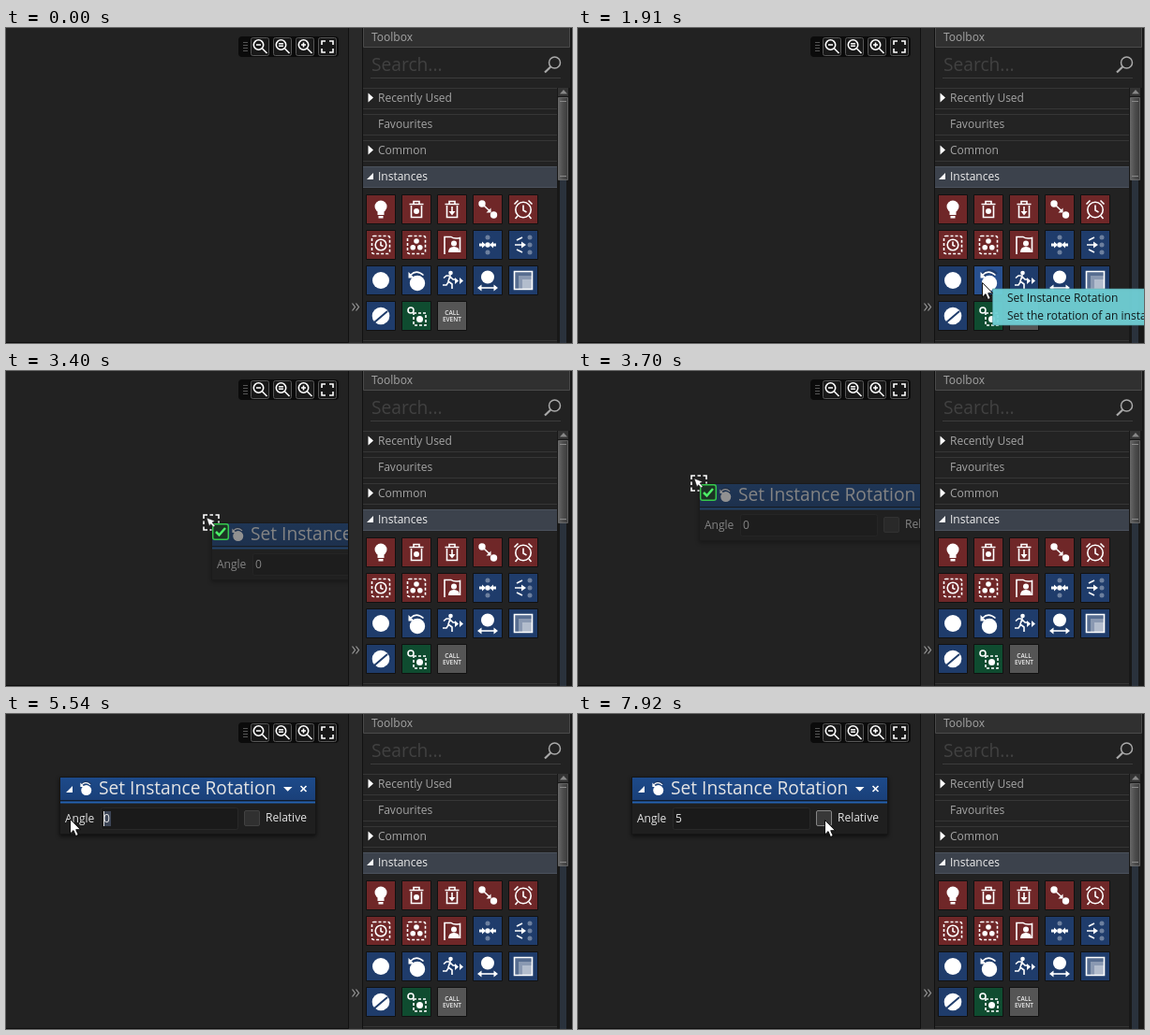
These frames come from a looping animation (604x337 px, 8000 ms). An HTML page:

```html
<!DOCTYPE html>
<html lang="en">
<head>
<meta charset="utf-8">
<title>Toolbox drag and drop</title>
<style>
  html, body { margin: 0; width: 100%; height: 100%; overflow: hidden; background: #222; }
  svg { display: block; width: 604px; height: 337px; }
  text { font: 12px "Open Sans", sans-serif; fill: #a4a4a4; white-space: pre; }
  .big { font-size: 19.2px; }
  .line { fill: none; stroke: #fff; stroke-width: 1.6; }
  .dash { fill: none; stroke: #fff; stroke-width: 1.6; stroke-dasharray: 3 2; }
  .white { fill: #fff; }
  .lite text { fill: #e4e4e4; }
  #node { filter: drop-shadow(0 2px 2px #0009); }
</style>
</head>
<body>
<svg viewBox="0 0 604 337">
  <defs>
    <clipPath id="work"><path d="M0 0H365V337H0Z"/></clipPath>
    <linearGradient id="head" x2="0" y2="1">
      <stop stop-color="#1d4a8a"/><stop offset="1" stop-color="#1a4079"/>
    </linearGradient>
    <linearGradient id="thumb">
      <stop stop-color="#666"/><stop offset=".5" stop-color="#4c4c4c"/><stop offset="1" stop-color="#3c3c3c"/>
    </linearGradient>
    <g id="turn">
      <circle class="white" cx="16" cy="18" r="8.2"/>
      <path d="M8 11Q15 1 23 9" fill="none" stroke="#1f3c6b" stroke-width="5"/>
      <path class="line" stroke-width="2" d="M9 9Q15 3 22.500 9.500"/>
      <path class="white" d="M6.500 6V12.500H13Z"/>
    </g>
    <g id="lens">
      <rect x=".5" y=".5" width="19" height="19" rx="2" fill="#181818" stroke="#565656"/>
      <circle class="line" cx="8.500" cy="8" r="5.200"/>
      <path class="line" stroke-width="2.200" d="M12.500 12L17.500 17"/>
    </g>
    <path id="arrow" d="M.5 .5V16L4 12.600L6.500 18.500L9.200 17.300L6.700 11.700H11.500Z"/>
  </defs>

  <path fill="#222" d="M0 0H604V337H0Z"/>

  <g transform="translate(248 9)">
    <rect width="107" height="22" rx="4" fill="#0b0b0b"/>
    <path d="M5 6.500H10M5 9.500H10M5 12.500H10M5 15.500H10" stroke="#555"/>
    <use href="#lens" x="13" y="1"/><use href="#lens" x="37" y="1"/><use href="#lens" x="61" y="1"/>
    <rect x="85.500" y="1.500" width="19" height="19" rx="2" fill="#181818" stroke="#565656"/>
    <path class="line" stroke-width="1.400" d="M19 9H24M43 7.800H48M43 10.200H48M67 9H72M69.500 6.500V11.500"/>
    <path class="line" d="M89 9V5H93M97 5H101V9M101 13V17H97M93 17H89V13"/>
  </g>

  <g clip-path="url(#work)">
    <g id="node" class="lite">
      <path fill="#1f1f1f" stroke="#161616" d="M-.5 -.5H272.500V60.500H-.5Z"/>
      <path fill="url(#head)" d="M0 0H272V24H0Z"/>
      <path fill="#101b2c" d="M0 24H272V26H0Z"/>
      <path fill="#2462b0" d="M0 25.500H272V27.500H0Z"/>
      <path class="white" d="M13 9V16H6ZM238 10H247.500L242.700 14.800Z"/>
      <use href="#turn" transform="translate(17 1.500) scale(.67)"/>
      <text class="big" x="41" y="18">Set Instance Rotation</text>
      <path class="line" d="M256.500 9L262.500 15M262.500 9L256.500 15"/>
      <text x="5" y="48">Angle</text>
      <rect x="43.500" y="32.500" width="146" height="23" rx="2" fill="#1a1a1a" stroke="#292929"/>
      <path id="mark" fill="#3d4657" d="M46 36H54V52H46Z"/>
      <text id="value" x="46" y="48">0</text>
      <path id="caret" fill="#ddd" d="M0 36H1V52H0Z"/>
      <rect id="box" x="196.500" y="35.500" width="16" height="16" rx="1.500"/>
      <text x="219" y="47">Relative</text>
    </g>
  </g>
  <path fill="#0e0e0e" d="M0 336H366V337H0Z"/>

  <g id="panel">
    <path fill="#292929" d="M366 0H381V337H366Z"/>
    <path fill="#111" d="M365 0H366V337H365ZM380 0H381V337H380Z"/>
    <path d="M369.500 294.500L372.500 298.500L369.500 302.500M373.500 294.500L376.500 298.500L373.500 302.500" fill="none" stroke="#999" stroke-width="1.200"/>
    <path fill="#222" d="M381 0H602V337H381Z"/>
    <path fill="#303030" stroke="#4a4a4a" d="M381.500 -1H601.500V20.500H381.500Z"/>
    <text x="390" y="14">Toolbox</text>
    <text class="big" x="390" y="46" style="fill:#414141">Search...</text>
    <path fill="#3c3c3c" d="M389 53H592V54H389Z"/>
    <circle cx="585.500" cy="37" r="6" fill="none" stroke="#aaa" stroke-width="1.500"/>
    <path d="M581.200 41.500L575 47.500" stroke="#aaa" stroke-width="2.200"/>
    <g id="rows"></g>
    <path fill="#363636" d="M381 334H588V335H381Z"/>
    <path fill="#181818" d="M588 64H602V337H588Z"/>
    <path fill="#2a323c" d="M591 162H598V337H591Z"/>
    <path fill="#333" d="M589 64H600V73H589Z"/>
    <path fill="#888" d="M591 70.500H599L595 66Z"/>
    <path fill="url(#thumb)" stroke="#777" stroke-width=".7" d="M589.500 74.500H599.500V162.500H589.500Z"/>
    <path fill="#888" d="M591 78H598V79H591ZM591 158H598V159H591Z"/>
    <path fill="#171717" d="M602 0H604V337H602Z"/>
    <g id="tiles"></g>
  </g>

  <g id="tip">
    <path fill="#70d0d6" stroke="#4a8f94" stroke-width=".6" d="M442.500 279H606V318H442.500Z"/>
    <text x="458" y="293" style="fill:#10191a">Set Instance Rotation</text>
    <text x="458" y="312" style="fill:#10191a">Set the rotation of an instance.</text>
  </g>

  <g id="drag">
    <g id="big" transform="translate(10 7) scale(2.100)">
      <path fill="#1f3c6b" stroke="#111" stroke-width=".5" d="M0 0H30V30H0Z"/>
      <use href="#turn"/>
    </g>
    <path id="badge" d="M13 10.700H25Q27.300 10.700 27.300 13V25Q27.300 27.300 25 27.300H13Q10.700 27.300 10.700 25V13Q10.700 10.700 13 10.700Z" fill="#1c3324" stroke="#35c94d" stroke-width="1.500"/>
    <path d="M14 19L17.500 22.500L24 15" fill="none" stroke="#4df067" stroke-width="2.500"/>
    <path d="M1 5V1H5M7.500 1H11M13.500 1H17V5M17 7.500V9.500M1 7.500V11M1 13.500V17H5M7.500 17H9.500" class="line" stroke="#fff"/>
    <path class="white" stroke="#111" stroke-width=".5" d="M4 4L13 7.500L10 9L13 12.500L11.500 14L8.500 10.700L7 13Z"/>
  </g>
  <use id="cursor" href="#arrow" fill="#fff" stroke="#000" stroke-width=".9"/>
</svg>

<script>
const $ = id => document.getElementById(id);
const LOOP = 8000;

// Section headers
$('rows').innerHTML = ['Recently Used', 'Favourites', 'Common', 'Instances'].map((name, i) => {
  const y = 64 + 28 * i, open = i === 3;
  const sign = open ? 'M392 155V162H385Z' : i === 1 ? '' : `M386.500 ${y + 5.5}L392 ${y + 10.5}L386.500 ${y + 15.5}Z`;
  return `<path fill="${open ? '#3c424c' : '#232323'}" d="M381 ${y}H588V${y + 23}H381Z"/>
    <path fill="${open ? '#4b525d' : '#363636'}" d="M381 ${y}H588V${y + 1}H381ZM381 ${y + 22}H588V${y + 23}H381Z"/>
    <path class="white" d="${sign}"/>
    <text x="397" y="${y + 15}" ${open ? 'style="fill:#eee"' : ''}>${name}</text>`;
}).join('');

// Tile glyphs, drawn on a 30 x 30 cell
const dot = (x, y, r, more = '') => `<circle class="white" cx="${x}" cy="${y}" r="${r}" ${more}/>`;
const ring = (x, y, r) => `<circle class="line" cx="${x}" cy="${y}" r="${r}"/>`;
const line = d => `<path class="line" d="${d}"/>`;
const solid = d => `<path class="white" d="${d}"/>`;
const frame = '<rect class="dash" x="5.500" y="5.500" width="19" height="19" rx="2"/>';
const bin = line('M9.500 11V23.500H20.500V11M7.500 9.500H22.500M12 9V6.500H18V9');
const dim = 'opacity=".35"';

const RED = '#6f2728', BLUE = '#1f3c6b', GREEN = '#0f4c30', GREY = '#555';
const tiles = [
  [RED, dot(15, 12, 6.5) + solid('M11.500 15H18.500V21H11.500ZM12.500 22H17.500V24.500H12.500Z')],
  [RED, bin + dot(15, 17, 3)],
  [RED, bin + line('M15 12V19') + solid('M11.500 17H18.500L15 21.500Z')],
  [RED, dot(9, 9, 3.7) + dot(21.5, 21, 3.7) + line('M11 11L18 17.500') + solid('M18.500 13.500V18.500H13.500Z')],
  [RED, ring(15, 15.5, 8.2) + line('M15 10.500V16L18.500 18M5.500 9.500L9.500 5.500M24.500 9.500L20.500 5.500M9 22L6.500 25M21 22L23.500 25')],
  [RED, frame + ring(15, 15, 5.8) + line('M15 11.500V15.500L17.500 16.500')],
  [RED, frame + dot(15, 11, 2.8) + dot(11.2, 17.7, 2.8) + dot(18.8, 17.7, 2.8)],
  [RED, line('M7 25V6.500H14Q17 9 23.500 7.500V23') + dot(17, 13.5, 3) + solid('M11 23Q11 17 17 17T23 23Z')],
  [BLUE, dot(15, 7, 2.5, dim) + dot(15, 23, 2.5, dim) + dot(15, 15, 2.7) + solid('M6 13.500H9V11.500L13 15L9 18.500V16.500H6ZM24 13.500H21V11.500L17 15L21 18.500V16.500H24Z')],
  [BLUE, dot(22, 7, 2.5, dim) + dot(22, 23, 2.5, dim) + dot(22, 15, 2.5, dim) + line('M6 15H14M8 10L14 7M8 20L14 23') + solid('M13 11.500L18 15L13 18.500Z')],
  [BLUE, dot(15, 15, 9)],
  [BLUE, '<use href="#turn"/>'],
  [BLUE, dot(13.5, 7, 2.3) + line('M6 12.500L9 10H13L11 16L15 19V24M11 17L9 20H5M13 11L16 14H18') + solid('M18 12L22 15.500L18 19ZM23 12L27 15.500L23 19Z')],
  [BLUE, dot(15, 11.5, 7) + line('M7 23H23') + solid('M8.500 19.500V26.500L4 23ZM21.500 19.500V26.500L26 23Z')],
  [BLUE, '<path fill="#fff" opacity=".25" d="M6 6H24V24H6Z"/><path fill="#fff" opacity=".3" d="M10 10H24V24H10Z"/><path fill="#fff" opacity=".35" d="M14 14H24V24H14Z"/>' + line('M5.500 5.500H24.500V24.500H5.500Z')],
  [BLUE, dot(15, 15, 9.3) + `<path d="M8 22L22 10" stroke="${BLUE}" stroke-width="2"/>`],
  [GREEN, ring(9, 9, 3) + '<rect class="dash" x="12" y="12" width="13" height="13"/>' + dot(18.5, 18.5, 3.5)],
  [GREY, ['CALL', 'EVENT'].map((s, i) => `<text x="15" y="${13.5 + 7 * i}" text-anchor="middle" style="font-size:6.500px;font-weight:600;fill:#eee">${s}</text>`).join('')]
];
$('tiles').innerHTML = tiles.map(([fill, glyph], i) =>
  `<g transform="translate(${385 + 38 * (i % 5)} ${179 + 38 * Math.floor(i / 5)})">
    <path fill="${fill}" stroke="#111" d="M-.5 -.5H30.500V30.500H-.5Z"/>${glyph}</g>`).join('');
const turnTile = $('tiles').children[11].firstElementChild;

// Pointer moves: start, end, steps, from, bend, to, ease-out power
const moves = [
  [1280, 1820, 7, [305, 326], [375, 290], [431, 272], 1.4],
  [2330, 2480, 3, [432, 270], [434, 268], [435, 266], 1],
  [2940, 3700, 11, [407, 257], [250, 170], [120, 111], 1.2],
  [3790, 4260, 7, [112, 105], [82, 83.5], [52, 62], 1.326],
  [4540, 4540, 1, [48, 58], [48, 58], [48, 58], 1],
  [4720, 5130, 6, [56, 66], [95, 84], [127, 104], 1.2],
  [5310, 5540, 4, [120, 105], [95, 109], [67.5, 112], 1.2],
  [6770, 7400, 9, [71, 114], [180, 152], [268, 107], 1.2],
  [7580, 7580, 1, [264, 113], [264, 113], [264, 113], 1],
  [7770, 7770, 1, [263, 113], [263, 113], [263, 113], 1]
];

function pointer(t) {
  const move = moves.findLast(m => t >= m[0]);
  if (!move) return [-50, -50];
  const [start, end, steps, a, b, c, power] = move;
  const gap = (end - start) / (steps - 1);
  const k = steps > 1 ? Math.min(1, Math.floor((t - start) / gap + 1e-6) / (steps - 1)) : 1;
  const p = 1 - (1 - k) ** power, q = 1 - p;
  return a.map((v, i) => Math.round(q * q * v + 2 * p * q * b[i] + p * p * c[i]));
}

const within = (v, a, b) => v >= a && v < b;
const show = (id, on) => $(id).style.visibility = on ? 'visible' : 'hidden';
const place = (id, x, y) => $(id).setAttribute('transform', `translate(${x} ${y})`);
const tipSteps = [[1820, .4], [1910, .95], [2000, .98], [2090, 1], [2760, 0]];

function draw(t) {
  const [x, y] = pointer(t);
  const dragging = within(t, 2940, 4720), placed = t >= 4540, overWork = x < 361;

  show('cursor', !dragging);
  place('cursor', x, y);
  show('drag', dragging);
  place('drag', x, y);
  show('big', dragging && !overWork);

  show('node', placed || dragging && overWork);
  place('node', placed ? 58 : x + 10, placed ? 68 : y + 10);
  $('node').style.opacity = placed ? 1 : .5;

  const hover = t < 2760 && within(x, 423, 454) && within(y, 255, 286);
  turnTile.setAttribute('fill', hover ? '#28508f' : BLUE);
  $('tip').style.opacity = (tipSteps.findLast(s => t >= s[0]) || [0, 0])[1];

  const typed = t >= 6520;
  $('value').textContent = typed ? '5' : '0';
  show('mark', within(t, 5390, 6520));
  show('caret', within(t, 5310, 5910) || within(t, 6370, 6980) || within(t, 7450, 7920));
  place('caret', typed || t < 5390 ? 53 : 46, 0);

  const over = placed && within(x, 254, 272) && within(y, 103, 120);
  $('box').setAttribute('fill', over ? '#383838' : '#303030');
  $('box').setAttribute('stroke', over ? '#858585' : '#414141');
}

const begin = performance.now();
function tick() {
  draw((performance.now() - begin) % LOOP);
  requestAnimationFrame(tick);
}
tick();
</script>
</body>
</html>
```
